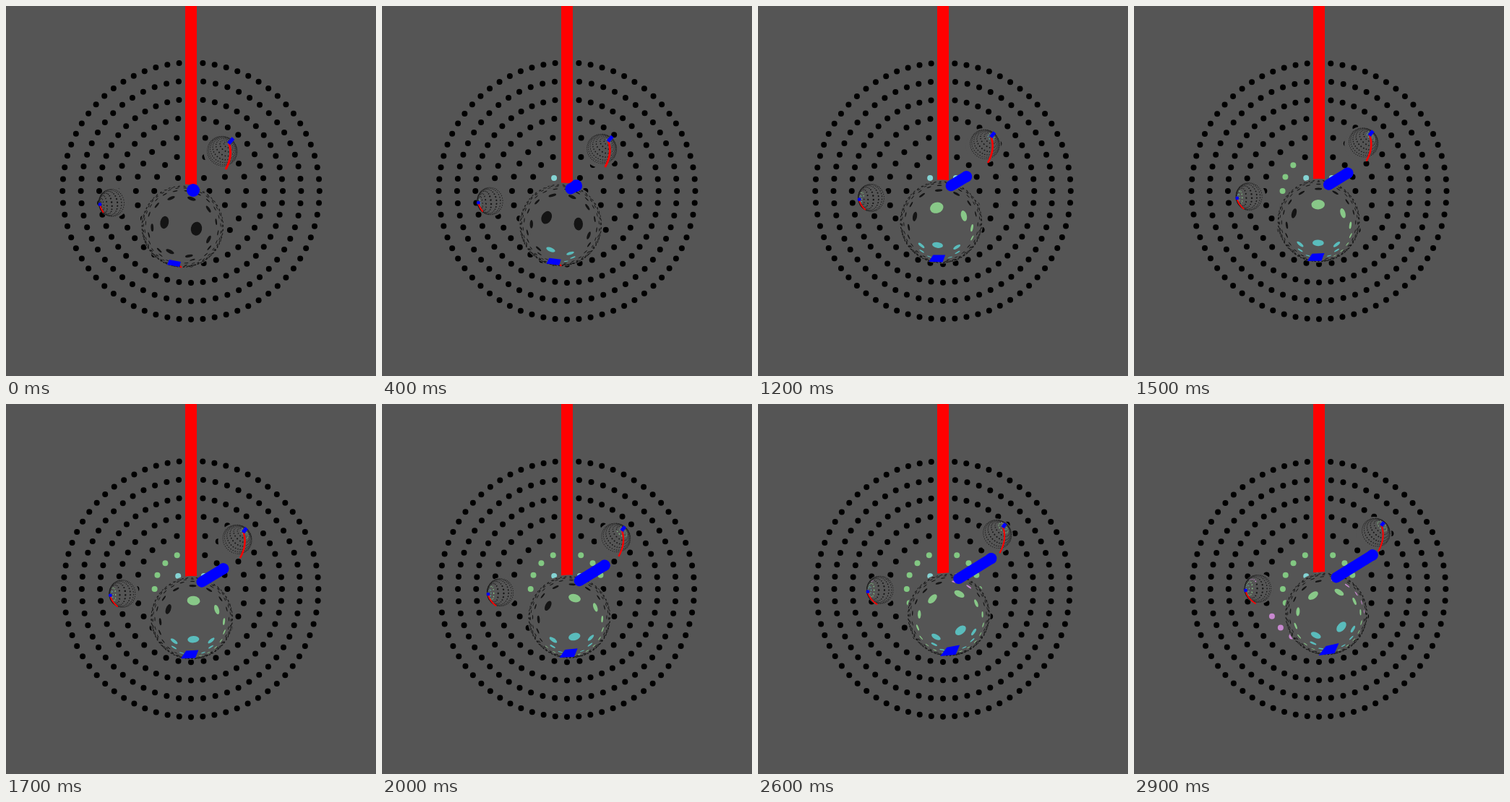
Animation, 512 px wide and 512 px high, one loop 3 s. Source, as an HTML page with a canvas:

```html
<!DOCTYPE html>
<html>
<head>
<meta charset="utf-8">
<style>
html, body { margin: 0; width: 100%; height: 100%; overflow: hidden; background: #555; }
canvas { display: block; width: 512px; height: 512px; }
</style>
</head>
<body>
<canvas id="stage" width="512" height="512"></canvas>
<script>
const ctx = document.getElementById('stage').getContext('2d');
const LOOP = 3000, STEP = 100, LAST = 29;
const GREY = '#555', RED = '#f00', BLUE = '#00f';
const RING_GAP = 25.4, DOT = 4, GLASS = 1.5;
const RING_COUNTS = [8, 16, 24, 36, 48, 56, 68];
const PAINT = ['#84d4d4', '#82c882', '#c888d0'];
const LENS_PAINT = ['#5abcbc', '#88c888', '#c888d0'];

// Dots run clockwise from the bottom of each ring, inner ring first.
const dots = [];
RING_COUNTS.forEach((count, ring) => {
  const r = RING_GAP * (ring + 1);
  for (let i = 0; i < count; i++) {
    const a = i / count * Math.PI * 2;
    dots.push({ x: -Math.sin(a) * r, y: Math.cos(a) * r, ring });
  }
});

const mix = (a, b, p) => a + (b - a) * p;
const mixPoint = (a, b, p) => [mix(a[0], b[0], p), mix(a[1], b[1], p)];

function ellipse(x, y, rx, ry, turn, color) {
  ctx.fillStyle = color;
  ctx.beginPath();
  ctx.ellipse(x, y, rx, ry, turn, 0, Math.PI * 2);
  ctx.fill();
}

const disc = (x, y, r, color) => ellipse(x, y, r, r, 0, color);

function polygon(points, color) {
  ctx.fillStyle = color;
  ctx.beginPath();
  points.forEach(([x, y]) => ctx.lineTo(x, y));
  ctx.fill();
}

function line(from, to, width, color) {
  ctx.strokeStyle = color;
  ctx.lineWidth = width;
  ctx.beginPath();
  ctx.moveTo(...from);
  ctx.lineTo(...to);
  ctx.stroke();
}

function arc(from, bend, to, width) {
  ctx.strokeStyle = RED;
  ctx.lineWidth = width;
  ctx.beginPath();
  ctx.moveTo(...from);
  ctx.quadraticCurveTo(...bend, ...to);
  ctx.stroke();
}

const dotPosition = (dot, p) =>
  [256 + dot.x * mix(1, 0.986, p), 256 + dot.y * mix(1, 0.994, p)];

// Where a ray entering a glass ball at height h (in radii) meets the plane behind it.
function refract(h, depth) {
  const bend = 2 * (Math.asin(h) - Math.asin(h / GLASS));
  return depth * Math.tan(bend) - h / Math.cos(bend);
}

// Inverse of refract: the height at which a plane distance is seen.
function seenAt(distance, depth) {
  let low = 0, high = 0.9975;
  for (let i = 0; i < 16; i++) {
    const mid = (low + high) / 2;
    if (refract(mid, depth) < Math.abs(distance)) low = mid;
    else high = mid;
  }
  return Math.sign(distance) * low;
}

function ball([cx, cy], radius, planeDepth, p, lit) {
  disc(cx, cy, radius, GREY);
  const depth = planeDepth / radius;
  dots.forEach((dot, i) => {
    const [px, py] = dotPosition(dot, p);
    const x = cx - px, y = cy - py;
    const distance = Math.max(Math.hypot(x, y), 0.1);
    const inner = seenAt((distance - DOT) / radius, depth) * radius;
    const outer = seenAt((distance + DOT) / radius, depth) * radius;
    const middle = (inner + outer) / 2;
    ellipse(cx + x / distance * middle, cy + y / distance * middle,
      Math.max((outer - inner) / 2, 0.45), Math.max(DOT * middle / distance, 0.45),
      Math.atan2(y, x), i < lit ? LENS_PAINT[dot.ring] : '#141414');
  });
}

function field(p, lit) {
  dots.forEach((dot, i) => {
    disc(...dotPosition(dot, p), DOT, i < lit ? PAINT[dot.ring] : '#000');
  });
}

function bigBall(p, lit) {
  const center = mixPoint([244.5, 304.5], [266, 290], p);
  ctx.fillStyle = RED;
  ctx.fillRect(248, 0, 16, center[1] - 57);
  ball(center, 58, 116, p, lit);

  ctx.save();
  ctx.translate(...mixPoint([232, 356], [269.5, 340], p));
  polygon([
    mixPoint([-6, -5], [-4, -5], p),
    mixPoint([10, -2], [14, -9], p),
    mixPoint([8, 5], [8, 5], p),
    mixPoint([-9, 2], [-14, 8], p)
  ], BLUE);
  if (p < 0.2) line([9, 4], [11, 6], 2, RED);
  ctx.restore();
}

function rightBall(p, lit) {
  const center = mixPoint([298, 202.5], [332, 180.5], p);
  ball(center, 24.5, 180, p, lit);
  ctx.save();
  ctx.translate(...center);
  arc([10.5, -12.5], [16.5, 4.5], [6, 23.5], mix(3, 2, p));
  line([10, -12], mixPoint([16.5, -19.5], [14, -17], p), 5, BLUE);
  ctx.restore();
}

function leftBall(p, lit) {
  const center = mixPoint([148.5, 272], [173, 255.5], p);
  ball(center, 21, 130, p, lit);
  ctx.save();
  ctx.translate(...center);
  arc([-18.5, 4], mixPoint([-16.5, 10], [-15.5, 14], p), mixPoint([-13.5, 14], [-4.5, 21], p), 1.8);
  disc(-18.5, 2.5, 2.4, BLUE);
  ctx.restore();
}

function arrow(p) {
  ctx.lineCap = 'round';
  const tip = mixPoint([259, 255], [330, 209], p);
  line(mixPoint([258, 255], [280, 240], p), tip, 15, BLUE);
  disc(...tip, mix(9, 7.8, Math.min(1, p * 4)), BLUE);
  ctx.lineCap = 'butt';
}

function draw(step) {
  const p = step / LAST;
  ctx.fillStyle = GREY;
  ctx.fillRect(0, 0, 512, 512);
  field(p, step);
  bigBall(p, step);
  rightBall(p, step);
  leftBall(p, step);
  arrow(p);
}

const start = performance.now();
let shown = -1;
function tick() {
  const step = Math.floor((performance.now() - start) % LOOP / STEP);
  if (step !== shown) draw(shown = step);
  requestAnimationFrame(tick);
}
tick();
</script>
</body>
</html>
```
